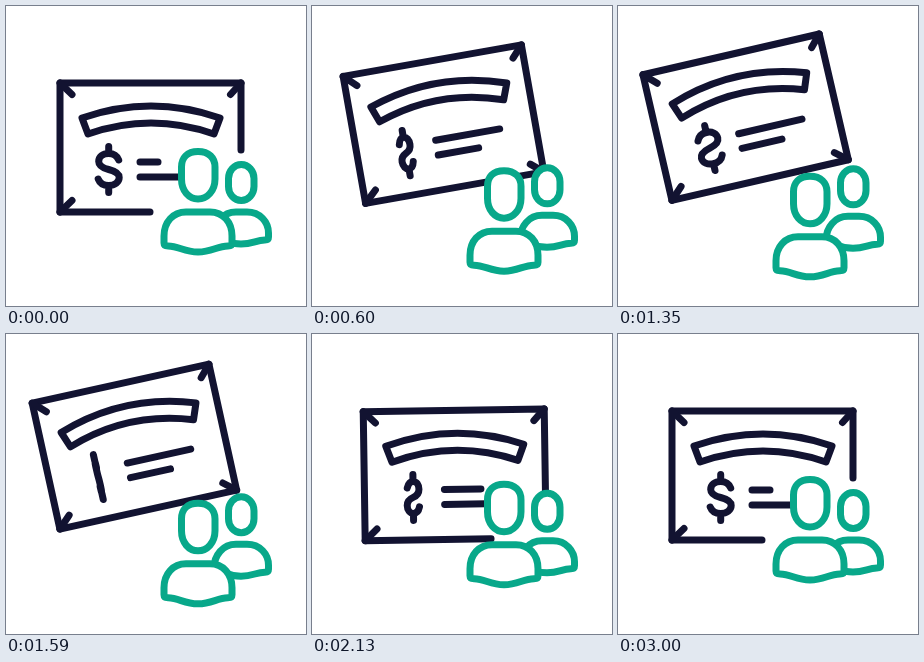
Write an HTML page that moves like this. It is 300 px wide and 300 px high and loops after 4.53 s.

```html
<!DOCTYPE html>
<html lang="en">
<head>
<meta charset="utf-8">
<title>Cheque and people</title>
<style>
  html, body { margin: 0; height: 100%; overflow: hidden; background: #fff; }
  svg { display: block; width: 100%; height: 100%; }
  g { stroke-width: 7; stroke-linecap: round; stroke-linejoin: round; }
  #card { fill: none; stroke: #121331; }
  .person { fill: #fff; stroke: #08a88a; }
</style>
</head>
<body>
<svg viewBox="0 0 300 300">
  <g id="card">
    <path id="border"/>
    <path d="M54 77l12 11.500M235 77l-10.500 11.500M54 206l12-11.500"/>
    <path id="lastCorner"/>
    <path d="M76 112Q145 88 214 112L208 128Q145 106 82 128Z"/>
    <path id="dollar" d="M0-22.500V-16M0 17V23.500M10-9C8-14 4-15.500 0-15.500C-6-15.500-10-12-10-7.500C-10-3-6-1 0 .5S10.500 4 10.500 8.500S6 16.500 0 16.500S-9 14-10.500 10"/>
    <path id="lines"/>
  </g>
  <g id="back" class="person">
    <path d="M208 230C208 217 217 206 230 206H241C254 206 262.500 216 262.500 227V231Q262.500 234 259 234C250 234 247 238 235 238Q227 238 220 235Q208 235 208 230Z"/>
    <rect x="222.500" y="158.500" width="25.500" height="36" rx="12.700" ry="14"/>
  </g>
  <g id="front" class="person">
    <path d="M158 230C158 216 167 206 180 206H204C217 206 226 216 226 230V237Q226 240 222 240C211 240 206 246 192 246C178 246 173 240 162 240Q158 240 158 237Z"/>
    <path d="M192 145.500C203 145.500 209 152 209 161V173C209 185 201 193 192 193C183 193 175.500 185 175.500 173V161C175.500 152 181 145.500 192 145.500Z"/>
  </g>
</svg>
<script>
const LOOP = 4530, STEP = 30, ACTIVE = 3000;

// Quick start with a long, soft landing.
function rise(time, duration) {
  const u = Math.min(1, time / duration);
  return 1 - (1 - u) ** 3 * (1 + 3 * u);
}
const fall = (time, middle, width) => 1 / (1 + Math.exp((time - middle) / width));
const bump = (time, middle, width) => Math.exp(-(((time - middle) / width) ** 2));

const set = (id, name, value) => document.getElementById(id).setAttribute(name, value);

function draw(time) {
  const lift = rise(time, 1080) * fall(time, 1935, 120);
  const sink = rise(time, 1080) * fall(time, 1955, 120);
  const open = rise(time, 540) * fall(time, 2100, 70);
  const overshoot = bump(time, 2330, 190);

  const dx = -17 * lift + 3 * overshoot;
  const dy = -30.5 * lift + 13 * overshoot;
  const angle = -13.1 * lift + 3.9 * overshoot;
  set('card', 'transform', `translate(${dx} ${dy}) rotate(${angle} 144.5 141.5)`);
  set('border', 'd', `M${144 + 91 * open} 206H54V77H235V${144 + 62 * open}`);
  set('lastCorner', 'd', open > .5 ? `M235 206l${-12 * open} ${-10 * open}` : '');
  set('lines', 'd', `M134 156h${18 + 47 * open}M134 171h41`);

  // The dollar sign makes three turns; its outline is rebuilt so the stroke keeps its weight.
  const turn = Math.cos(6 * Math.PI * Math.min(1, time / 2720));
  set('dollar', 'transform', `translate(102.7 163) scale(${Math.abs(turn) < .02 ? .02 : turn} 1)`);
  set('dollar', 'vector-effect', 'non-scaling-stroke');
  set('dollar', 'stroke-width', 7 * innerWidth / 300);

  set('front', 'transform', `translate(0 ${25 * sink})`);
  set('back', 'transform', `translate(0 ${4.4 * sink})`);
}

const start = performance.now();
function tick() {
  const time = (performance.now() - start) % LOOP;
  draw(Math.min(ACTIVE, Math.floor(time / STEP) * STEP));
  requestAnimationFrame(tick);
}
tick();
</script>
</body>
</html>
```
